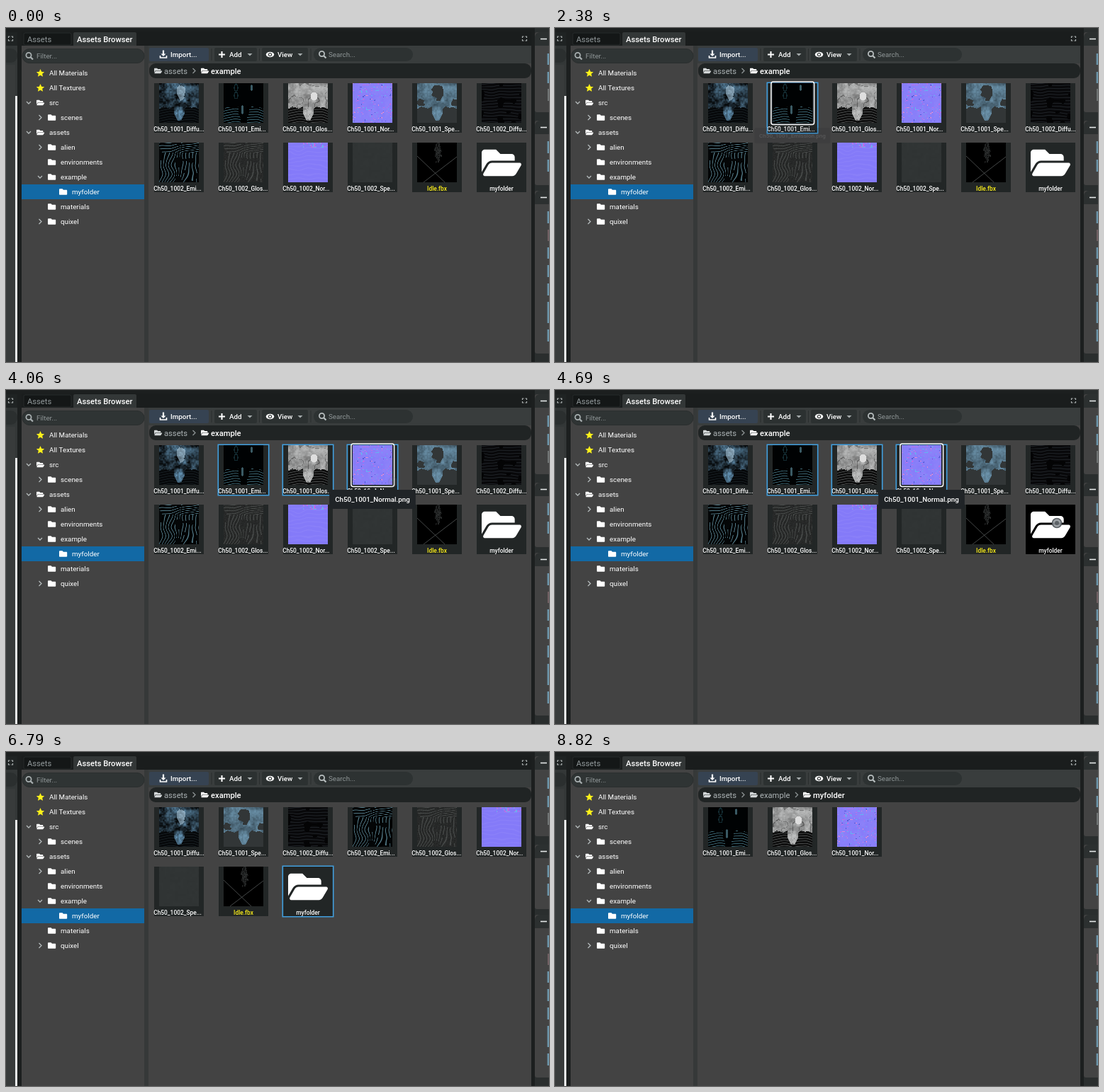
An HTML page with a canvas for the animation above (9520 ms loop, 766 by 472 pixels).

```html
<!DOCTYPE html>
<html lang="en">
<head>
<meta charset="utf-8">
<title>Assets Browser</title>
<style>
html, body { margin: 0; width: 100%; height: 100%; overflow: hidden; background: #1c1f1f; }
canvas { display: block; }
</style>
</head>
<body>
<canvas id="stage" width="766" height="472"></canvas>
<script>
const LOOP = 9520, STEP = 70;
const g = document.getElementById('stage').getContext('2d');
const DARK = '#1c1f1f', PANEL = '#434343', TILE = '#222626', BLUE = '#419fdf';
const { abs, sin, hypot, floor, min, max, PI } = Math;

const folder = new Path2D('M464 128H272l-64-64H48C21.5 64 0 85.5 0 112v288c0 26.5 21.5 48 48 48h416c26.5 0 48-21.5 48-48V176c0-26.5-21.5-48-48-48z');
const openFolder = new Path2D('M573 292L500 416A64 64 0 0 1 445 448H45c-18.5 0-30-20-20.7-36l72.4-124A64 64 0 0 1 152 256h400c18.5 0 30 20 21 36zM152 224h328v-48c0-26.5-21.5-48-48-48H272l-64-64H48C21.5 64 0 85.5 0 112v278l69-118C86 242 118 224 152 224z');

// ---- drawing helpers ----
function box(x, y, w, h, fill, r = 0, stroke, lw = 1) {
  g.beginPath();
  g.roundRect(x, y, w, h, r);
  if (fill) { g.fillStyle = fill; g.fill(); }
  if (stroke) { g.strokeStyle = stroke; g.lineWidth = lw; g.stroke(); }
}
function line(pts, color = '#fff', lw = 1) {
  g.beginPath();
  pts.forEach(([x, y]) => g.lineTo(x, y));
  g.strokeStyle = color;
  g.lineWidth = lw;
  g.stroke();
}
function poly(pts, color) {
  g.beginPath();
  pts.forEach(([x, y]) => g.lineTo(x, y));
  g.fillStyle = color;
  g.fill();
}
function disc(x, y, r, fill, stroke, lw = 1) {
  g.beginPath();
  g.arc(x, y, r, 0, 2 * PI);
  if (fill) { g.fillStyle = fill; g.fill(); }
  if (stroke) { g.strokeStyle = stroke; g.lineWidth = lw; g.stroke(); }
}
function text(s, x, y, size = 9.8, color = '#fff', weight = 400, align = 'left') {
  g.font = `${weight} ${size}px Roboto, sans-serif`;
  g.textAlign = align;
  g.fillStyle = color;
  g.fillText(s, x, y + size * 0.36);
}
function icon(path, x, y, width, color = '#fff') {
  const k = width / (path === folder ? 512 : 576);
  g.save();
  g.translate(x, y - 256 * k);
  g.scale(k, k);
  g.fillStyle = color;
  g.fill(path);
  g.restore();
}
function chevron(x, y, down, color = '#b4babb') {
  line(down ? [[x - 3, y - 1.5], [x, y + 1.5], [x + 3, y - 1.5]]
            : [[x - 1.5, y - 3.5], [x + 2, y], [x - 1.5, y + 3.5]], color, 1.3);
}
function lens(x, y, color) {
  disc(x - 1, y - 1, 3.6, null, color, 1.8);
  line([[x + 1.5, y + 1.5], [x + 5, y + 5]], color, 2.2);
}
function expand(x, y) {
  for (const [a, b] of [[-1, -1], [1, -1], [1, 1], [-1, 1]])
    line([[x + a, y + 3 * b], [x + 3 * a, y + 3 * b], [x + 3 * a, y + b]], '#aeb4b4', 1.2);
}

// ---- procedural thumbnails ----
const hash = (x, y) => { const v = sin(x * 127.1 + y * 311.7) * 43758.5453; return v - floor(v); };
function noise(x, y) {
  const i = floor(x), j = floor(y), ease = t => t * t * (3 - 2 * t);
  const u = ease(x - i), v = ease(y - j);
  const top = hash(i, j) * (1 - u) + hash(i + 1, j) * u;
  const low = hash(i, j + 1) * (1 - u) + hash(i + 1, j + 1) * u;
  return top * (1 - v) + low * v;
}
const shade = (c, k) => c.map(v => v * k);
const ridge = v => max(0, sin(v)) ** 2;
const side = x => abs(x - 28);
const blot = (x, y) => 0.65 * noise(x / 6, y / 6) + 0.35 * noise(x / 2 + 9, y / 2);
const isBody = (x, y) => y + 5 * noise(x / 5, y / 5) < 37 || (side(x) < 8 - max(0, y - 42) * 0.5 && y < 53);
const fan = (x, y) => isBody(x, y) ? 0 :
  ridge(1.75 * (y + 1.5 * noise(x / 8, 3) - 0.012 * (side(x) - 12) ** 2));
const contour = (x, y) => ridge(1.5 * (x * (y < 14 ? 0.25 : 0.9) + (y < 14 ? y : 0.2 * y) + 11 * noise(x / 17 + 4, y / 15)));
const patch = (x, y) => noise(x / 9 + 7, y / 8 + 2) > 0.3;

function normalMap(x, y, busy) {
  const n = noise(x / 2.4 + busy * 30, y / 1.7), m = hash(floor(x / 2), floor(y / 2) + busy);
  if (busy ? y < 7 && x > 20 && n > 0.6 : n > 0.83) return m > 0.5 ? [190, 110, 230] : [100, 180, 240];
  if (!busy && n < 0.12) return m > 0.5 ? [85, 90, 215] : [220, 140, 210];
  const wave = busy ? 6 * ridge(y * 1.1 + 9 * noise(x / 14, y / 12)) : 10 * blot(x, y);
  return [132 + wave, 122 + wave, 249];
}
const paint = {
  diffuse1(x, y) {
    if (!isBody(x, y)) return shade([42, 56, 64], 0.15 + 0.4 * fan(x, y));
    const n = blot(x, y);
    if (hypot((x - 30) / 7, (y - 13) / 12) < 0.6 + 0.5 * n) return shade([138, 168, 188], 0.6 + 0.5 * n);
    return shade([70, 103, 126], max(0.12, 1.9 * n - 0.3) * (1 - side(x) / 80));
  },
  emission1(x, y) {
    if (y > 31 && side(x) > 4) return shade([72, 124, 140], 0.85 * fan(x, y));
    const rod = hypot((x - 26) / 1.5, (y - 37) / 7) < 1 || hypot((x - 39) / 1.5, (y - 6) / 5) < 1;
    const ring = abs(hypot((x - 17) / 2.5, (y % 11 - 6) / 5) - 1) < 0.25 && x < 21 && y < 22;
    return rod ? [58, 90, 100] : ring ? [18, 42, 48] : [0, 2, 3];
  },
  gloss1(x, y) {
    if (!isBody(x, y)) return shade([105, 108, 108], 0.12 + 0.6 * fan(x, y));
    if (hypot((x - 36) / 5, (y - 18) / 6) < 1) return [222, 222, 222];
    const seam = abs(noise(x / 8 + 3, y / 8) - 0.5) < 0.04 ? 0.7 : 1;
    return shade([172, 173, 173], seam * (0.65 + 0.5 * blot(x, y)));
  },
  normal1: (x, y) => normalMap(x, y, 0),
  specular1(x, y) {
    const hole = hypot((x - 28) / 9, (y - 13) / 11) < 0.55 + 0.6 * noise(x / 4, y / 4);
    const gap = hypot((side(x) - 25) / 8, (y - 27) / 6) < 0.5 + 0.6 * noise(x / 3, y / 3);
    if (!isBody(x, y) || hole || gap) return [50, 54, 55];
    return shade([94, 128, 149], 0.55 + 0.65 * blot(x, y));
  },
  diffuse2: (x, y) => shade([38, 42, 48], patch(x, y) ? 0.2 + 0.6 * ridge(y * 1.5 + 5 * noise(x / 13, y / 14)) : 0.1),
  emission2: (x, y) => shade([84, 124, 138], patch(x, y) ? contour(x, y) ** 1.4 : 0.05),
  gloss2: (x, y) => shade([74, 77, 76], 0.45 + (patch(x, y) ? 0.45 * contour(x, y) : 0) + 0.15 * hash(x, y)),
  normal2: (x, y) => normalMap(x, y, 1),
  specular2: (x, y) => shade([48, 52, 52], 0.98 + 0.04 * noise(x / 4, y / 4)),
  idle(x, y) {
    const figure = hypot((x - 29) / 6, (y - 14) / 20) < 0.35 + 0.7 * noise(x / 2, y / 3);
    return figure ? shade([52, 55, 55], 0.3 + 0.6 * hash(x, y)) : [0, 0, 0];
  }
};
function makeThumb(fn) {
  const c = document.createElement('canvas');
  c.width = c.height = 56;
  const q = c.getContext('2d'), img = q.createImageData(56, 56);
  for (let i = 0; i < 3136; i++) img.data.set([...fn(i % 56, floor(i / 56)), 255], i * 4);
  q.putImageData(img, 0, 0);
  return c;
}
const thumbs = {};
for (const k in paint) thumbs[k] = makeThumb(paint[k]);

// ---- content ----
const caption = {
  diffuse: 'Diffu', emission: 'Emi', gloss: 'Glos', normal: 'Nor', specular: 'Spe'
};
const set2 = ['diffuse2', 'emission2', 'gloss2', 'normal2', 'specular2', 'idle', 'myfolder'];
const moved = ['emission1', 'gloss1', 'normal1'];
const views = [
  ['diffuse1', ...moved, 'specular1', ...set2],
  ['diffuse1', 'specular1', ...set2],
  moved
];
const tree = [
  ['All Materials', 0, '*'], ['All Textures', 0, '*'], ['src', 0, 'v'], ['scenes', 1, '>'],
  ['assets', 0, 'v'], ['alien', 1, '>'], ['environments', 1, ''], ['example', 1, 'v'],
  ['myfolder', 2, ''], ['materials', 1, ''], ['quixel', 1, '>']
];

function drawTree() {
  box(22, 25, 173, 447, PANEL);
  box(23, 29.5, 172, 20, '#2f3434', 10, '#2a2e2e');
  lens(33, 39.5, '#a9b0b1');
  text('Filter...', 43, 39.5, 9.8, '#8f9697');
  tree.forEach(([name, depth, mark], i) => {
    const x = 61 + 16 * depth, y = 63.5 + 21 * i;
    if (name === 'myfolder') box(22, y - 10.5, 173, 21, '#1269a5');
    if (mark === '*') {
      poly([...Array(10)].map((_, k) => {
        const a = k * PI / 5 - PI / 2, r = k % 2 ? 2.8 : 6;
        return [48.5 + r * Math.cos(a), y + 0.5 + r * sin(a)];
      }), '#fff21a');
    } else {
      if (mark) chevron(x - 29, y, mark === 'v');
      icon(mark === 'v' && !depth ? openFolder : folder, x - 18, y, 11.2);
    }
    text(name, x, y);
  });
}

function drawToolbar() {
  box(201, 25, 540, 25, '#393d3d');
  box(202, 28, 84, 19, '#364352', 2);
  box(294, 28, 60, 19, '#2c3131', 2);
  box(361, 28, 65, 19, '#2c3131', 2);
  for (const x of [290, 357.5, 430]) line([[x, 29], [x, 46]], '#2a2e2e');
  line([[222, 31.5], [222, 38]], '#fff', 2.2);
  poly([[218.5, 36.5], [225.5, 36.5], [222, 40]], '#fff');
  line([[217.5, 39], [217.5, 42], [226.5, 42], [226.5, 39]], '#fff', 1.6);
  text('Import...', 232, 37, 9.8, '#fff', 500);
  line([[300, 37.5], [309, 37.5]], '#fff', 2);
  line([[304.5, 33], [304.5, 42]], '#fff', 2);
  text('Add', 315, 37, 9.8, '#fff', 500);
  g.beginPath();
  g.ellipse(372.5, 37.5, 5.7, 3.8, 0, 0, 2 * PI);
  g.fillStyle = '#fff';
  g.fill();
  disc(372.5, 37.5, 2.6, '#2c3131');
  disc(372.5, 37.5, 1.5, '#fff');
  text('View', 383, 37, 9.8, '#fff', 500);
  for (const x of [344, 415]) poly([[x - 3.5, 36], [x + 3.5, 36], [x, 39.5]], '#a5abac');
  box(434, 28, 140, 19, '#2d3232', 9.5);
  lens(446.5, 37.5, '#b7bdbe');
  text('Search...', 455, 37.5, 9.8, '#8f9697');
}

function drawCrumbs(view) {
  box(202, 50, 539, 21, '#202424', 9);
  const names = ['assets', 'example', 'myfolder'].slice(0, view === 2 ? 3 : 2);
  names.forEach((name, i) => {
    const x = [223, 289, 364][i], last = i === names.length - 1;
    icon(openFolder, x - 14, 60.5, 11.2, last ? '#fff' : '#d3d7d8');
    text(name, x, 60.5, 11.2, last ? '#fff' : '#aeb5b7', last ? 500 : 400);
    if (!last) chevron(x + (i ? 51.5 : 42), 60.5, false, '#8d9495');
  });
}

function drawEdges() {
  // left neighbour
  box(0, 6, 16, 19, '#1f2323');
  expand(6.5, 15);
  box(0, 25, 16, 447, '#333737');
  box(-10, 29, 26, 20, '#2b2f2f', 9);
  box(0, 52, 13, 420, '#383b3b');
  box(13, 96, 3, 376, '#e9ecec');
  // right neighbour
  box(746, 0, 20, 472, '#2a2e2e');
  const marks = [[36, 16], [62, 16], [160, 17], [186, 17], [259, 17], [310, 16], [335, 17], [361, 17], [387, 30], [426, 17]];
  [[6, 113], [131, 91], [230, 230]].forEach(([y, h]) => {
    box(746, y, 24, h, PANEL, 3);
    box(746, y, 24, 19, '#2c3030', [7, 0, 0, 0]);
    line([[754, y + 9.5], [763, y + 9.5]], '#e4e7e7', 1.6);
  });
  marks.forEach(([y, h]) => box(763.6, y, 3, h, '#6c95aa'));
  box(764, 86, 2, 17, '#707474');
  box(764, 285, 2, 16, '#715f63');
}

function drawFrame(view) {
  box(0, 0, 766, 472, DARK);
  drawEdges();
  box(22, 5, 719, 20, '#1a1d1d');
  box(25, 7, 67, 17, '#141717', 2, '#272b2b');
  text('Assets', 30, 15.5, 11.2, '#949b9d');
  box(95, 6, 89, 19, '#333737', [2, 2, 0, 0]);
  text('Assets Browser', 100, 15.5, 11.2, '#fff', 500);
  expand(731.5, 15);
  box(195, 25, 6, 447, '#363939');
  box(201, 25, 540, 447, PANEL);
  drawTree();
  drawToolbar();
  drawCrumbs(view);
}

// ---- motion ----
const ramp = (t, a, b) => max(0, min(1, (t - a) / (b - a)));

function drawTile(id, i, { selected, focused, dropping, alpha = 1 }) {
  const x = 209 + 91 * (i % 6), y = 78 + 84 * floor(i / 6);
  box(x, y, 70, 70, dropping ? '#000' : TILE);
  if (id === 'myfolder') icon(openFolder, x + 7, y + 28.5, 56);
  else {
    g.globalAlpha = alpha;
    g.drawImage(thumbs[id], x + 7, y);
    if (id === 'idle') {
      line([[x + 7, y + 19], [x + 46, y + 56]], '#565a5a', 0.8);
      line([[x + 63, y + 20], [x + 16, y + 56]], '#565a5a', 0.8);
    }
    g.globalAlpha = 1;
  }
  const kind = caption[id.slice(0, -1)];
  if (kind) text(`Ch50_100${id.slice(-1)}_${kind}...`, x - 0.8, y + 65, 8.4, '#fff', 500);
  else if (id === 'idle') text('Idle.fbx', x + 35, y + 65, 8.4, '#fff21a', 500, 'center');
  else text(id, x + 35, y + 65, 8.4, '#fff', 500, 'center');
  if (selected) box(x - 0.7, y - 0.7, 71.4, 71.4, null, 0, BLUE, 1.6);
  if (focused) {
    box(x + 6, y - 1, 58.500, 58.500, null, 2, '#16212a', 1);
    box(x + 4.9, y - 2.1, 60.7, 60.7, null, 3, '#fff', 1.5);
  }
}

function tooltip(s, x, y, show, arrowUp = true) {
  if (show <= 0) return;
  g.save();
  g.globalAlpha = show;
  g.translate(x, y);
  g.scale(0.8 + 0.2 * show, 0.8 + 0.2 * show);
  g.font = '500 9.8px Roboto, sans-serif';
  const w = g.measureText(s).width + 16;
  box(-w / 2, 0, w, 27, '#202427', 3);
  poly(arrowUp ? [[-4, 0], [4, 0], [0, -4]] : [[-4, 27], [4, 27], [0, 31]], '#202427');
  text(s, 0, 13.2, 9.8, '#fff', 500, 'center');
  g.restore();
}

function render(t) {
  const view = t < 5810 ? 0 : t < 8190 ? 1 : 2;
  const p = ramp(t, 4060, 4690), e = p * p * (3 - 2 * p);
  const dragX = 546 + 162 * e, dragY = 130 + 58 * e;
  const dragging = view === 0 && t >= 4060;

  const selectedFrom = view === 0 ? { emission1: 1190, normal1: 2450, gloss1: 2940 } :
    view === 1 ? { emission2: t < 6510 ? 5810 : LOOP, myfolder: 6790 } : {};
  const focus = view === 0 ? (t >= 2870 ? 'normal1' : t >= 2170 ? 'emission1' : '') :
    view === 1 && t >= 7910 ? 'myfolder' : '';

  drawFrame(view);
  views[view].forEach((id, i) => drawTile(id, i, {
    selected: t >= selectedFrom[id],
    focused: id === focus,
    dropping: id === 'myfolder' && dragging && dragX > 664,
    alpha: id === 'idle' && view === 1 ? ramp(t, 6020, 6230) : 1
  }));

  if (view === 0) {
    tooltip('Ch50_1001_Emission.png', 335, 141, ramp(t, 1190, 1400) * (1 - ramp(t, 2250, 2400)));
    tooltip('Ch50_1001_Normal.png', 517, 141, ramp(t, 2450, 2660));
  } else if (view === 1) {
    tooltip('myfolder', 426, 128, ramp(t, 6860, 7070), false);
  }
  if (dragging) {
    g.globalAlpha = 0.1 + 0.8 * ramp(t, 4060, 4270);
    disc(dragX, dragY, 6.5, '#92989c', '#4d5256', 1.6);
    disc(dragX, dragY, 3, '#565c61');
    g.globalAlpha = 1;
  }
}

function tick() {
  const t = performance.now() % LOOP;
  render(floor(t / STEP) * STEP);
  requestAnimationFrame(tick);
}
tick();
</script>
</body>
</html>
```
